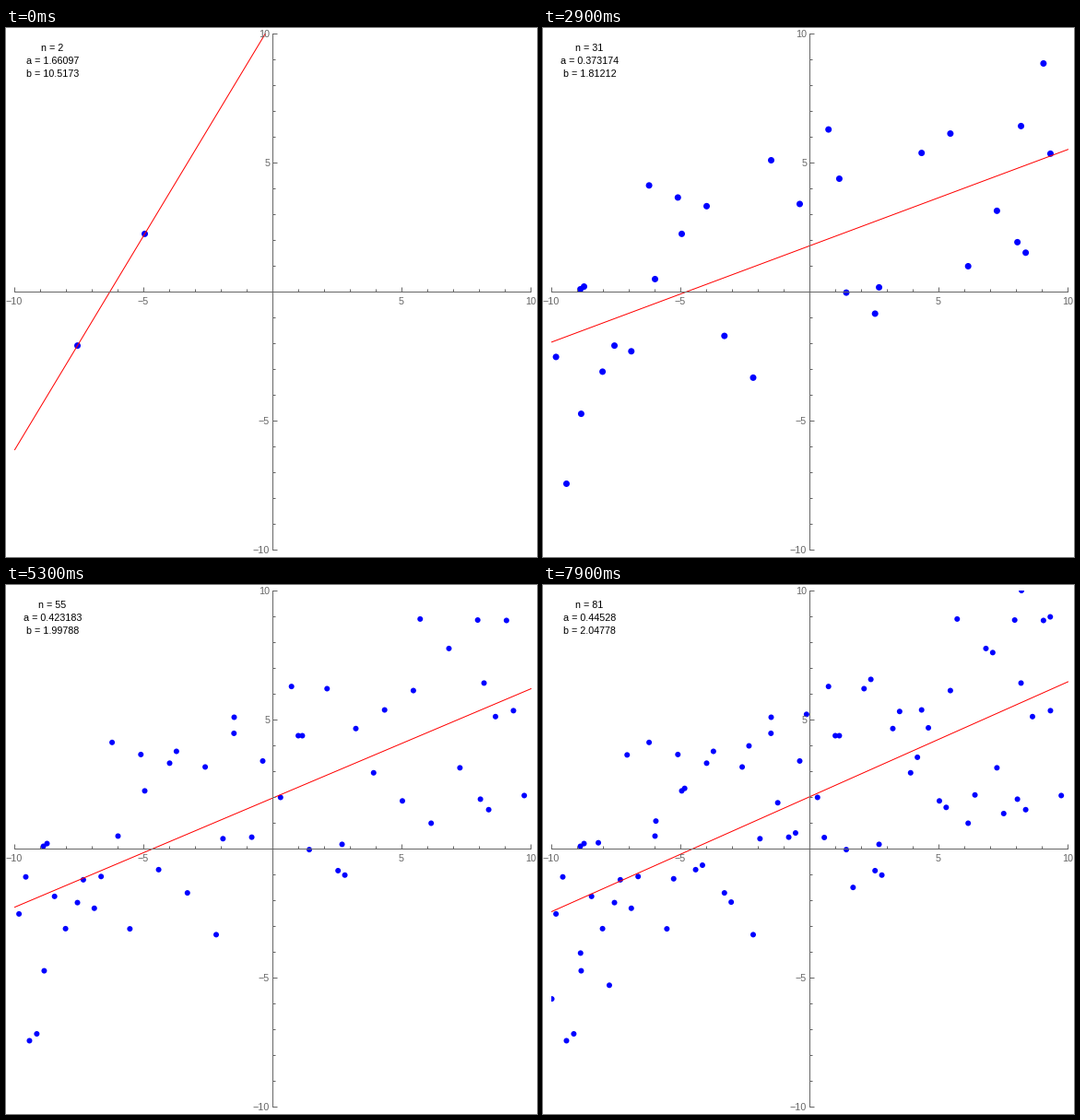
Write a matplotlib script that moves like this. It is 576 px wide and 574 px high and loops after 8000 ms.

```python
import numpy as np
import matplotlib.pyplot as plt
from matplotlib.animation import FuncAnimation
from matplotlib.collections import LineCollection
from matplotlib.patches import Rectangle

W, H, DPI = 576, 574, 64
PT = 72 / DPI                    # points per pixel
UNIT = 28                        # pixels per data unit
X0, Y0 = 289.5, 287              # data origin in pixels
AXIS_Y = 286.5                   # the axis line sits on a whole pixel row
FRAMES = 80
GRAY = "#666666"
FONT = dict(family="Liberation Sans", size=10.7 * PT)

# The first samples set the opening; the rest scatter around a rising line.
OPENING = [(-4.964, 2.27224), (-7.571, -2.0579), (9.32, 5.38), (-8.89, 0.125),
           (8.18, 6.45), (-9.43, -7.41), (2.68, 0.2), (-6, 0.52), (-8.86, -4.7),
           (-1.5, 5.125), (-8.75, 0.23), (1.14, 4.41), (8.04, 1.95)]


def make_samples(total):
    """Golden-ratio spread in x, noise on alternating sides of the line."""
    rng = np.random.default_rng(7)
    k = np.arange(total - len(OPENING))
    x = 20 * ((0.3 + k * 0.618034) % 1) - 10
    noise = rng.uniform(0, 5, k.size) * (-1.0) ** k
    return np.vstack([OPENING, np.column_stack([x, 0.47 * x + 2.1 + noise])])


def to_px(x, y):
    return X0 + UNIT * x, Y0 - UNIT * y


samples = make_samples(FRAMES + 1)
centers = np.column_stack(to_px(*samples.T))

fig = plt.figure(figsize=(W / DPI, H / DPI), dpi=DPI, facecolor="white")
ax = fig.add_axes([0, 0, 1, 1])
ax.set(xlim=(0, W), ylim=(H, 0))
ax.axis("off")


def put_text(x, y, s="", ha="center", color="black"):
    return ax.text(x, y, s, ha=ha, va="baseline", color=color, zorder=5, **FONT)


def draw_axes():
    segs = [[(9, AXIS_Y), (570, AXIS_Y)], [(X0, 6), (X0, 567)]]
    for k in range(-10, 11):
        if k == 0:
            continue
        major = k % 5 == 0
        size = 5 if major else 3
        x, y = X0 + UNIT * k, AXIS_Y - UNIT * k
        segs += [[(x, AXIS_Y), (x, AXIS_Y - size)], [(X0, y), (X0 + size, y)]]
        if major:
            label = str(k).replace("-", "\u2212")
            put_text(x - 0.5, 300, label, color=GRAY)
            put_text(286.2, y + 4, label, ha="right", color=GRAY)
    ax.add_collection(LineCollection(segs, colors=GRAY, linewidths=PT,
                                     zorder=4, snap=False))


draw_axes()
window = Rectangle((9, 6), 561, 561, transform=ax.transData)
dots = ax.scatter([], [], color="#0000ff", linewidths=0, zorder=2, snap=False)
line, = ax.plot([], [], color="#ff0000", lw=PT, zorder=3, snap=False)
for artist in (dots, line):
    artist.set_clip_path(window)
info = [put_text(50.4, y) for y in (25, 39, 53)]


def update(i):
    n = i + 2
    a, b = np.polyfit(*samples[:n].T, 1)
    diameter = 7 if n <= 50 else 6
    dots.set_offsets(centers[:n])
    dots.set_sizes(np.full(n, (diameter * PT) ** 2))
    ends = np.array([-10, 10])
    line.set_data(*to_px(ends, a * ends + b))
    for text, s in zip(info, (f"n = {n}", f"a = {a:.6g}", f"b = {b:.6g}")):
        text.set_text(s)
    return [dots, line, *info]


anim = FuncAnimation(fig, update, frames=FRAMES, interval=100, repeat=True,
                     repeat_delay=0, blit=False)
plt.show()
```
